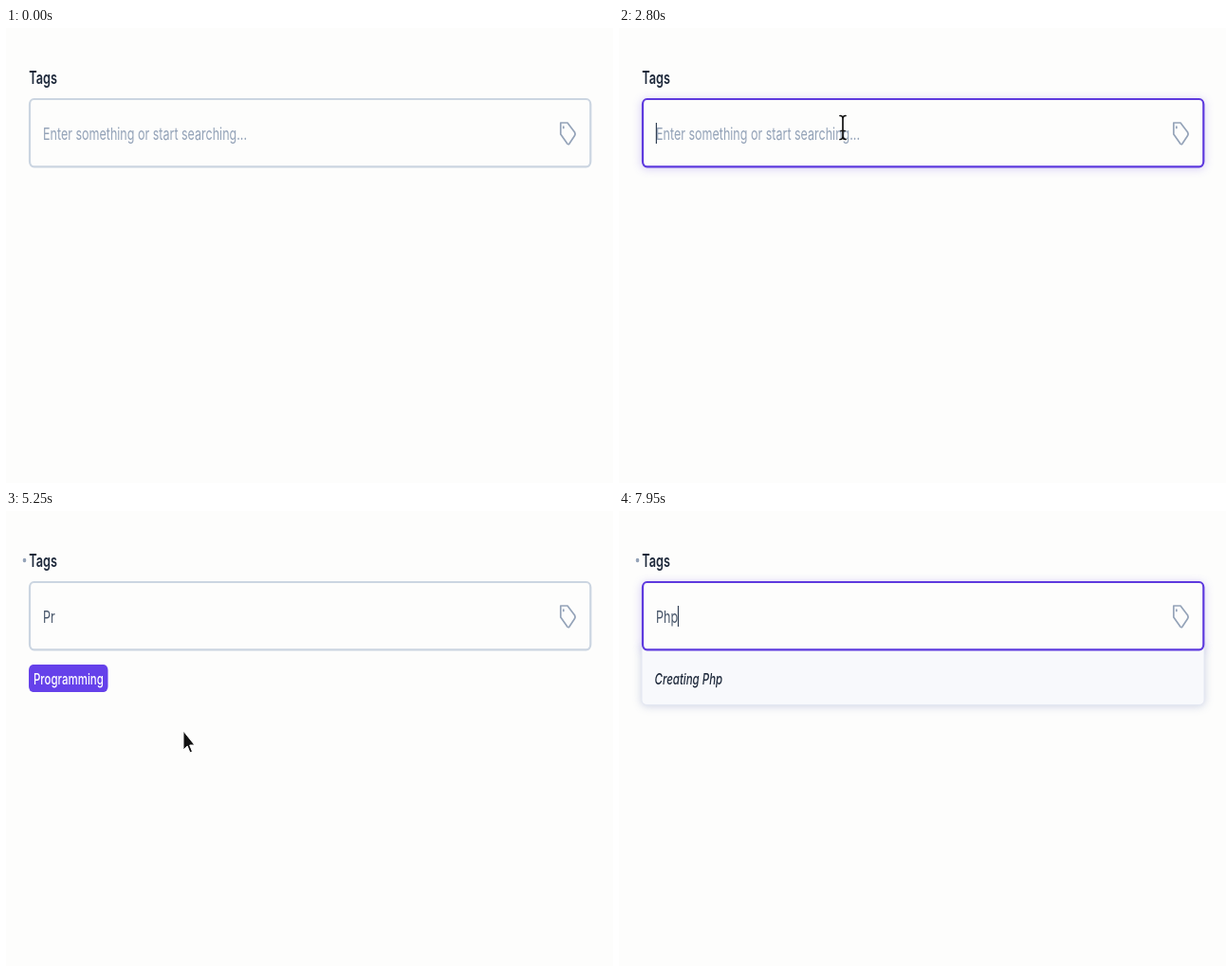
An HTML page that plays this animation: 640 px wide and 480 px high, repeating every 8000 ms.

```html
<!DOCTYPE html>
<html lang="en">
<head>
<meta charset="utf-8">
<title>Tags input</title>
<style>
  html, body { margin: 0; width: 100%; height: 100%; overflow: hidden; background: #fdfdfc; }
  svg { display: block; width: 100vw; height: 100vh; }
  text { font-family: Inter, Roboto, sans-serif; font-size: 16.4px; font-weight: 500; fill: #1e293b; white-space: pre; }
  .label { font-size: 18.2px; font-weight: 600; }
  .field { font-size: 17.9px; font-weight: 400; fill: #475569; }
  .hint { fill: #94a3b8; }
  .new { font-style: italic; }
  .chip { fill: #fff; }
</style>
</head>
<body>
<svg viewBox="0 0 640 480" preserveAspectRatio="none">
  <defs>
    <filter id="blur" x="-10%" y="-40%" width="120%" height="180%"><feGaussianBlur stdDeviation="5"/></filter>
    <filter id="soft" x="-10%" y="-40%" width="120%" height="180%"><feGaussianBlur stdDeviation="4"/></filter>
  </defs>
  <rect width="640" height="480" fill="#fdfdfc"/>

  <g id="chip">
    <ellipse cx="19.5" cy="52" rx="1.8" ry="2.2" fill="#94a3b8"/>
    <rect x="24" y="162" width="83.5" height="29" rx="4.5" ry="6" fill="#6541ea"/>
    <g transform="translate(29 183) scale(.7 1)"><text class="chip">Programming</text></g>
  </g>

  <rect id="glow" x="23" y="75" width="595" height="74" rx="6" fill="#6a4ee0" filter="url(#blur)"/>

  <g id="menu">
    <rect id="menuGlow" x="23" y="140" width="595" rx="6" fill="#8f9bc4" opacity=".4" filter="url(#soft)"/>
    <rect id="menuBox" x="24" y="140" width="593" rx="5" fill="#f8f9fc" stroke="#e4e8f2"/>
    <rect id="hover" x="27" y="219" width="586" height="38" rx="4" fill="#eff3f6"/>
    <path id="rule" d="M34 207H607" stroke="#cbd5e1" stroke-width="2"/>
    <g transform="translate(37.5 183) scale(.7 1)"><text id="create" class="new"></text></g>
    <g transform="translate(37.5 244) scale(.7 1)"><text id="item0"></text></g>
    <g transform="translate(37.5 284) scale(.7 1)"><text id="item1"></text></g>
  </g>

  <g transform="translate(24.3 59) scale(.7 1)"><text class="label">Tags</text></g>
  <rect id="box" x="25" y="75" width="591.3" height="71.3" rx="4.5" ry="5.5" fill="#fdfdfc" stroke-width="2.2"/>
  <g transform="translate(39 118) scale(.7 1)">
    <text id="hint" class="field hint">Enter something or start searching...</text>
    <text id="value" class="field"></text>
  </g>
  <rect id="caret" y="100" width="1.2" height="22" fill="#334155"/>
  <g fill="none" stroke="#94a3b8" stroke-width="1.7" stroke-linejoin="round">
    <path d="M584.8 100H592L599.6 110Q600.6 112 599.6 113.6L593.8 122.2Q593 123.3 592 122.2L584.8 112Z"/>
    <path d="M587.8 104V105.4" stroke-linecap="round"/>
  </g>

  <path id="beam" d="M-3-12.5Q0-12.5 0-9.5Q0-12.5 3-12.5M0-9.5V9.5M-3 12.5Q0 12.5 0 9.5Q0 12.5 3 12.5M-2 3.5H2"
    fill="none" stroke="#111" stroke-width="1.7" stroke-linecap="round"/>
  <path id="arrow" d="M0 0V20L4.2 16L7 23L9.5 21.8L6.7 15H12Z" fill="#111" stroke="#fff"/>
  <g id="hand" stroke="#111" stroke-width="1.4" stroke-linejoin="round" stroke-linecap="round">
    <path fill="#fff" d="M-2.7 1.2Q-1.6-1.4 .2 .8L2.2 8.8Q3.6 6.6 5 8.8Q6.8 7 7.9 9.6Q10.2 8.8 10.6 12V17Q10.2 20 8.8 21.8V25H-.2V22.6L-5.4 14.4Q-5.6 11-3 12.4L-.6 14.6Z"/>
    <path fill="none" d="M1.8 15V20.5M4.4 15V20.5M7 15V20.5"/>
  </g>
</svg>

<script>
const LOOP = 8000;
const $ = id => document.getElementById(id);
const set = (id, attrs) => { for (const k in attrs) $(id).setAttribute(k, attrs[k]); };
const show = (id, on) => set(id, { visibility: on ? 'visible' : 'hidden' });
const ramp = (t, from, length) => Math.min(1, Math.max(0, (t - from) / length));
const ease = p => p * p * (3 - 2 * p);
const blend = (a, b, p) => a.map((v, i) => Math.round(v + (b[i] - v) * p));

const IDLE = [203, 213, 225], HOVER = [148, 163, 184], FOCUS = [94, 58, 222];

// [start, value]; the last entry already started applies
const TYPED = [[0, ''], [2850, 'P'], [3300, 'Pr'], [6850, 'P'], [7500, 'Ph'], [7800, 'Php']];
const LIST = [[0, ['Programming', 'Sports']], [3450, ['Programming']], [6900, ['Sports']], [7750, []]];
const at = (steps, t) => steps.filter(s => s[0] <= t).pop();

// [time, x, y]
const PATH = [[100, 300, 495], [850, 245, 112], [1500, 236, 105], [4250, 236, 105],
  [4750, 187, 232], [5250, 187, 232], [5700, 163, 108], [8000, 163, 108]];

function pointer(t) {
  const i = Math.max(1, PATH.findIndex(p => p[0] >= t));
  const [t0, x0, y0] = PATH[i - 1], [t1, x1, y1] = PATH[i];
  const p = ease(ramp(t, t0, t1 - t0));
  return [x0 + (x1 - x0) * p, y0 + (y1 - y0) * p];
}

function draw(t) {
  const [typedAt, value] = at(TYPED, t);
  const items = at(LIST, t)[1];
  const [x, y] = pointer(t);
  const inBox = y > 74 && y < 147;

  const focused = t >= 1750 && t < 5050 || t >= 5850;
  const focus = ramp(t, 1750, 150) - ramp(t, 5050, 150) + ramp(t, 5870, 150);
  const menu = ramp(t, 2900, 150) - ramp(t, 5050, 150) + ramp(t, 5890, 150);
  const hover = ramp(t, 780, 150) - ramp(t, 4450, 100) + ramp(t, 5550, 100);

  // Field
  const rest = blend(IDLE, HOVER, hover);
  set('box', { stroke: `rgb(${blend(rest, FOCUS, focus * focus)})` });
  set('glow', { opacity: .25 * Math.sqrt(focus) });
  $('value').textContent = value;
  show('hint', !value);
  const blinkFrom = Math.max(typedAt, t < 5850 ? 1750 : 5850);
  show('caret', focused && (t - blinkFrom) % 1000 < 500);
  set('caret', { x: 38.8 + (value ? $('value').getComputedTextLength() * .7 : 0) });
  show('chip', t >= 5050);

  // Suggestions
  const bottom = items.length ? 225 + 40 * items.length : 204.5;
  set('menu', { opacity: menu });
  set('menuBox', { height: bottom - 140 });
  set('menuGlow', { height: bottom - 138 });
  $('create').textContent = 'Creating ' + value;
  $('item0').textContent = items[0] || '';
  $('item1').textContent = items[1] || '';
  show('rule', items.length > 0);

  // Pointer
  const shown = t >= 100 && t < 2850 || t >= 4250 && t < 6850;
  const onMenu = t < 5200 && t > 4250 && y >= 147;
  show('hover', onMenu && y > 215);
  show('beam', shown && inBox);
  show('hand', shown && onMenu);
  show('arrow', shown && !inBox && !onMenu);
  for (const id of ['beam', 'hand', 'arrow']) set(id, { transform: `translate(${x} ${y})` });
}

const start = performance.now();
function tick() {
  draw((performance.now() - start) % LOOP);
  requestAnimationFrame(tick);
}
tick();
</script>
</body>
</html>
```
